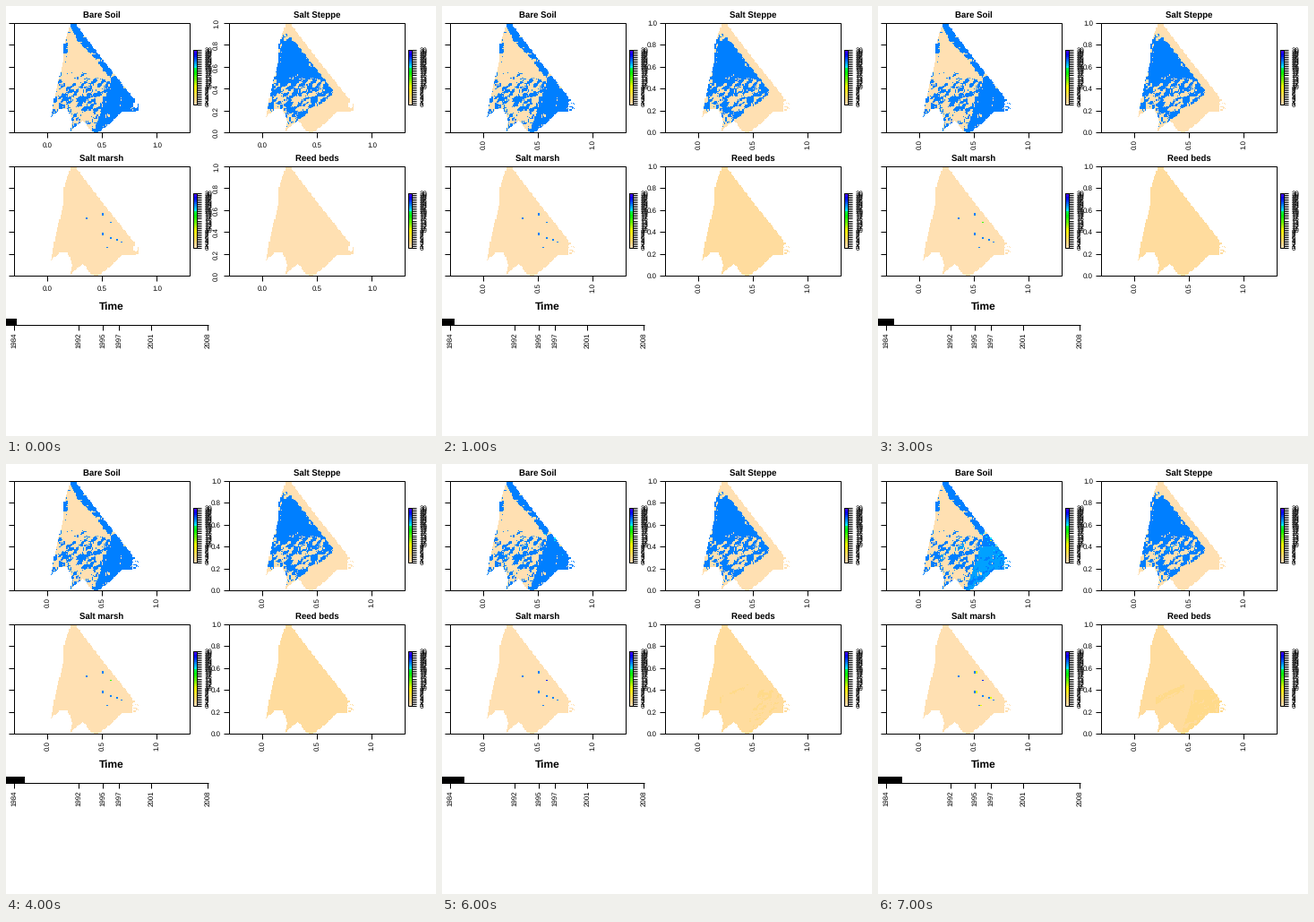
These frames come from a looping animation (480 px wide and 480 px high, 8000 ms). A matplotlib script:

```python
import numpy as np
import matplotlib.pyplot as plt
from matplotlib.animation import FuncAnimation
from matplotlib.colors import hsv_to_rgb
from matplotlib.path import Path
from matplotlib.patches import Rectangle

SIZE, FRAMES = 480, 8
N = 100                       # cells per map side
LEFT, TOP, SIDE = 46, 19, 122
DX, DY = 240, 160             # panel spacing

plt.rcParams["font.family"] = "Liberation Sans"
plt.rcParams["text.hinting"] = "none"
fig = plt.figure(figsize=(SIZE / 72, SIZE / 72), dpi=72, facecolor="white")
ax = fig.add_axes([0, 0, 1, 1])
ax.axis("off")


def topo(n=30):
    """Terrain palette from peach (low) to violet (high)."""
    k = n // 3
    hue = np.r_[np.linspace(43, 31, k), np.linspace(23, 11, k),
                np.linspace(10, 6, k)] / 60
    sat = np.r_[np.ones(2 * k), np.linspace(1, 0.3, k)]
    return hsv_to_rgb(np.c_[hue, sat, np.ones(n)])[::-1]


PALETTE = topo()
YELLOW, GREEN, CYAN, LIGHT, BLUE, DEEP = 10, 15, 20, 22, 23, 26

cell = (np.arange(N) + 0.5) * SIDE / N
X, Y = np.meshgrid(LEFT + cell, TOP + cell)


def noise(seed, reach=0):
    """Uniform noise, smeared into patches that rise to the right."""
    raw = np.random.default_rng(seed).random((N, N))
    span = range(-reach, reach + 1)
    mix = sum(np.roll(raw, (dy - dx // 2, dx), (0, 1))
              for dx in span for dy in range(-(reach // 2), reach // 2 + 1))
    return mix.ravel().argsort().argsort().reshape(N, N) / N ** 2


# Land: a straight shore on the right, a ragged one at the lower left.
COAST = [(74, 19), (77, 19), (101, 51), (124, 80), (149, 111), (148, 117),
         (130, 118), (115, 132), (103, 141), (95, 140), (86, 127), (71, 141),
         (74, 129), (69, 115), (61, 115), (50, 124), (55, 98), (64, 62),
         (65, 40), (72, 21)]
land = Path(COAST).contains_points(np.c_[X.ravel(), Y.ravel()]).reshape(N, N)
lagoon = np.hypot((X - 145) / 2.5, (Y - 110) / 4) < 1
first_land = land & ~lagoon
later_land = land & ((X < 141) | (noise(5) < 0.3))

# Cover: bare soil hugs the right shore and widens southwards,
# steppe fills the rest, and both mix in the middle.
patch = noise(11, 2)
depth = 77 + 0.78 * (Y - 20) - X
rim = depth < 8 + 4 * np.exp(-((Y - 40) / 8) ** 2) + 1.1 * np.maximum(0, Y - 82)
west = (X < 69) & (abs(Y - 47) < 10)
bare_odds = np.interp(Y, [68, 74, 90, 110], [0.01, 0.08, 0.42, 0.5])
bare_odds = np.where(rim, 0.95, np.where(west, 0.4, bare_odds))
bare = patch < bare_odds

steppe_odds = np.interp(Y, [24, 34, 40, 76, 90, 110, 130],
                        [0, 0.2, 0.96, 0.95, 0.6, 0.48, 0.3])
steppe = (patch > 1 - steppe_odds) & (depth > 10 + 2.2 * np.maximum(0, Y - 98))

# Where growth sets in late in the loop.
streak = (abs(Y - 104 + 0.45 * (X - 70)) < 4) & (abs(X - 86) < 16)
south = rim & (Y > 92)
fresh = noise(31, 2)
spark = noise(8)
shore = (depth < 11) & (Y > 68) & (Y < 106)

MARSH = [(90, 77), (108, 73), (117, 82), (108, 95), (117, 99), (124, 101),
         (129, 104), (113, 110)]


def near(x, y, rx=1.2, ry=1.0):
    return (abs(X - x) < rx) & (abs(Y - y) < ry)


def bare_map(i):
    grid = np.where(bare, BLUE, 0)
    if i >= 6:
        grow = streak if i == 6 else streak | south
        grid[bare & grow & (fresh < 0.1 + 0.55 * (i - 6))] = LIGHT
        grid[shore & (spark < 0.04 * (i - 5))] = CYAN
        grid[shore & (spark < 0.012 * (i - 5))] = YELLOW
    return grid


def steppe_map(i):
    grid = np.where(steppe, BLUE, 0)
    if i >= 7:
        grid[steppe & streak & (fresh < 0.2)] = LIGHT
    return grid


def marsh_map(i):
    grid = np.zeros((N, N), int)
    for spot in MARSH:
        grid[near(*spot)] = BLUE
    if i >= 3:
        grid[near(*MARSH[2])] = GREEN if i < 5 else DEEP
    if i >= 7:
        for x, y in MARSH[1::2]:
            grid[near(x + 2, y, 0.7)] = YELLOW
    return grid


def reed_map(i):
    grid = np.full((N, N), int(i > 0))
    if i >= 6:
        grid[(streak | south) & (fresh < 0.2 + 0.6 * (i - 6))] = 2
    return grid


MAPS = [("Bare Soil", bare_map), ("Salt Steppe", steppe_map),
        ("Salt marsh", marsh_map), ("Reed beds", reed_map)]


# Whole coordinates snap to the centre of that pixel.
def line(xs, ys):
    ax.plot(xs, ys, color="black", lw=1, solid_capstyle="butt", zorder=3)


def box(x, y, w, h):
    ax.add_patch(Rectangle((x, y), w, h, fill=False, lw=1, ec="black", zorder=3))


def label(x, y, s, size=7.9, **kw):
    return ax.text(x, y, s, fontsize=size, clip_on=True, zorder=4, **kw)


def title(x, y, s, size=9.6):
    label(x, y, s, size, weight="bold", ha="center", va="baseline")


def picture(data, x, y, w, h):
    return ax.imshow(data, extent=(x, x + w, y + h, y), interpolation="nearest",
                     aspect="auto", zorder=1)


def legend(x, y):
    picture(PALETTE[::-1, None], x, y, 4, 61)
    box(x, y, 4, 61)
    for v in range(31):
        ty = round(y + 61 * (1 - v / 30))
        line([x + 4, x + 9], [ty, ty])
        label(x + 12.5, ty + 0.5, str(v), va="center_baseline")


flat, turned = [], []         # tick labels of the first and the later frames


def panel(x, y, name):
    img = picture(np.zeros((N, N, 4)), x + LEFT, y + TOP, SIDE, SIDE)
    box(x + 9, y + TOP, 196, SIDE)
    title(x + 107, y + 13, name)
    for v in (0, 0.5, 1):
        tx, text = x + LEFT + v * SIDE, f"{v:.1f}"
        line([tx, tx], [y + 141, y + 147])
        flat.append(label(tx + 0.5, y + 158, text, ha="center", va="baseline"))
        turned.append(label(tx + 0.5, y + 149, text, rotation=90, ha="center", va="top"))
    for v in np.linspace(0, 1, 6):
        ty, text = round(y + TOP + (1 - v) * SIDE), f"{v:.1f}"
        line([x + 3, x + 9], [ty, ty])
        flat.append(label(x - 1.5, ty + 0.5, text, rotation=90, ha="right", va="center"))
        turned.append(label(x, ty + 0.5, text, ha="right", va="center_baseline"))
    legend(x + 209, y + 49)
    return img


images = [panel(DX * (k % 2), DY * (k // 2), name)
          for k, (name, _) in enumerate(MAPS)]

title(117.5, 339, "Time", 12)
line([9, 226], [356, 356])
for year in (1984, 1992, 1995, 1997, 2001, 2008):
    tx = 9 + 9 * (year - 1984)
    line([tx, tx], [356, 362])
    label(tx + 0.5, 364, str(year), rotation=90, ha="center", va="top")
bar = ax.add_patch(Rectangle((0, 349), 12, 8, fc="black", lw=0, zorder=2))

ax.set_xlim(0, SIZE)
ax.set_ylim(SIZE, 0)


def update(i):
    mask = (later_land if i else first_land).astype(float)
    for img, (_, values) in zip(images, MAPS):
        img.set_data(np.dstack([PALETTE[values(i)], mask]))
    for t in flat:
        t.set_visible(i == 0)
    for t in turned:
        t.set_visible(i > 0)
    bar.set_width(int(12 + 2.25 * i))
    return images + [bar]


anim = FuncAnimation(fig, update, frames=FRAMES, interval=1000,
                     repeat=True, repeat_delay=0, blit=False)
plt.show()
```
